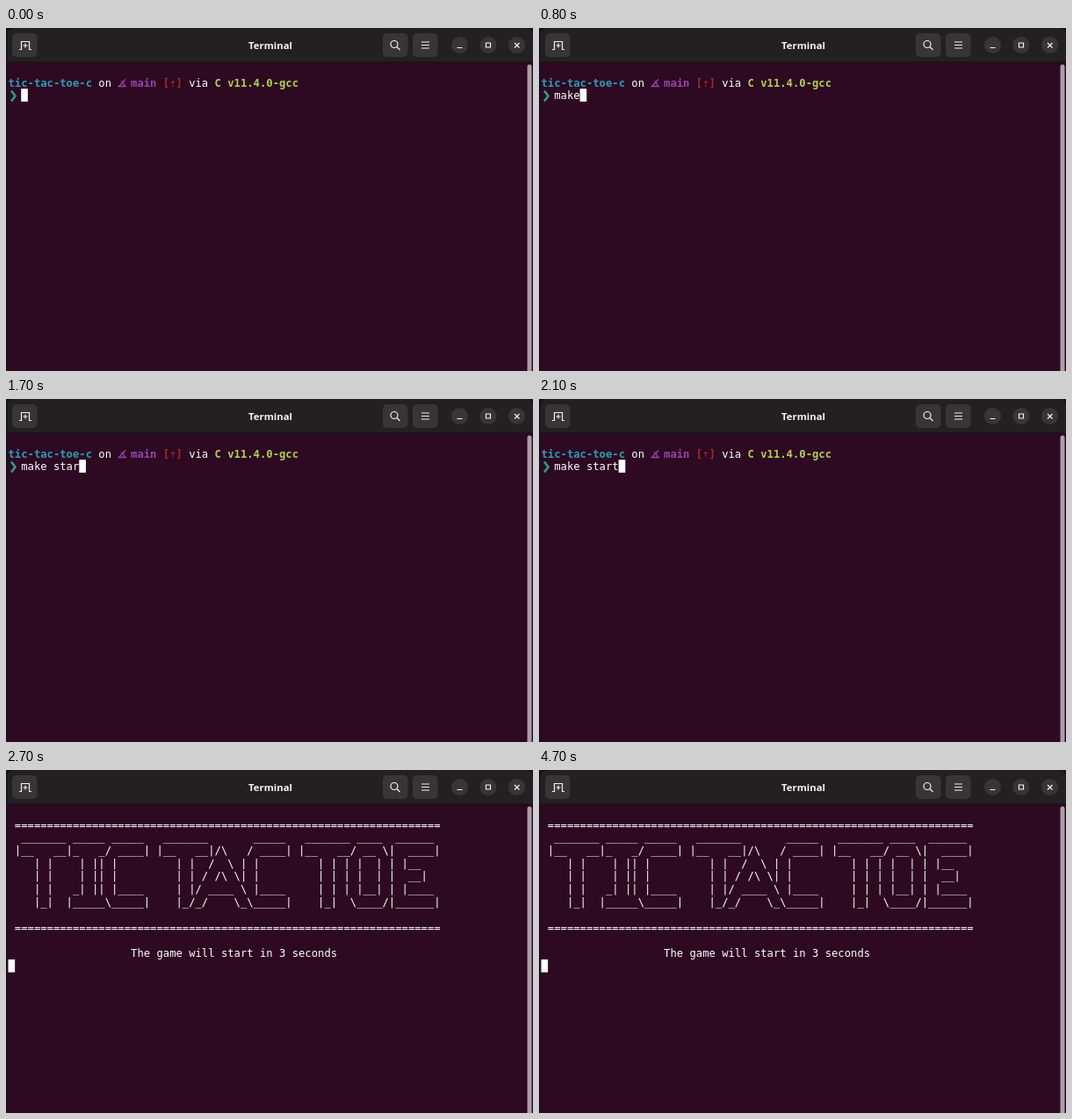
An HTML page with a canvas for the animation above (5300 ms loop, 600 by 391 pixels).

```html
<!DOCTYPE html>
<html lang="en">
<head>
<meta charset="utf-8">
<title>Terminal</title>
<style>
  html, body { margin: 0; width: 100%; height: 100%; overflow: hidden; background: #2d0922; }
  canvas { display: block; width: 600px; height: 391px; }
</style>
</head>
<body>
<canvas id="stage" width="600" height="391"></canvas>
<script>
const ctx = document.getElementById('stage').getContext('2d');
const LOOP = 5300, BANNER_AT = 2400, BLINK = 600, BLINK_FROM = 2900;
const CELL = 7.345, ROW = 14.67, LEFT = 2.5, TOP = 40.3;
const COMMAND = 'make start';
const KEY_TIMES = [300, 400, 500, 700, 900, 1300, 1500, 1600, 1700, 2100];
const RULE = '='.repeat(66);
const BANNER = [
  RULE,
  String.raw` _______ _____ _____   _______       _____   _______ ____  ______`,
  String.raw`|__   __|_   _/ ____| |__   __|/\   / ____| |__   __/ __ \|  ____|`,
  String.raw`   | |    | || |         | |  /  \ | |         | | | |  | | |__`,
  String.raw`   | |    | || |         | | / /\ \| |         | | | |  | |  __|`,
  String.raw`   | |   _| || |____     | |/ ____ \ |____     | | | |__| | |____`,
  String.raw`   |_|  |_____\_____|    |_/_/    \_\_____|    |_|  \____/|______|`,
  '',
  RULE,
  '',
  ' '.repeat(18) + 'The game will start in 3 seconds'
];

function box(x, y, w, h, radius, color) {
  ctx.fillStyle = color;
  ctx.beginPath();
  ctx.roundRect(x, y, w, h, radius);
  ctx.fill();
}

function stroke(path, color = '#f2f0f1', width = 1.2) {
  ctx.strokeStyle = color;
  ctx.lineWidth = width;
  ctx.stroke(new Path2D(path));
}

// Each character sits in its own terminal cell.
function print(text, col, row, color = '#fff', bold = false) {
  ctx.font = `${bold ? 'bold ' : ''}12.2px "DejaVu Sans Mono", monospace`;
  ctx.textAlign = 'left';
  ctx.fillStyle = color;
  [...text].forEach((char, i) => {
    if (char !== ' ') ctx.fillText(char, LEFT + (col + i) * CELL, TOP + row * ROW + 11.6);
  });
}

function cursor(col, row) {
  box(LEFT + col * CELL, TOP + row * ROW - 0.4, CELL + 0.3, ROW, 0, '#fff');
}

function drawWindow() {
  box(0, 0, 600, 391, 0, '#17101a');
  box(1.5, 0, 598.5, 391, [8, 8, 0, 0], '#2d0922');
  box(1.5, 0, 598.5, 39, [8, 8, 0, 0], '#232022');
  box(1.5, 38, 598.5, 1, 0, '#1a1619');
  box(593.5, 41.5, 5, 360, 2.5, '#aa9fa6');

  for (const x of [7, 429, 463]) box(x, 6, 28.5, 27, 5, '#383537');
  for (const x of [516.5, 549, 581.5]) box(x - 9.5, 10, 19, 19, 9.5, '#383537');

  stroke('M15 24.5H17.5V15.5H26.5V24.5H29M22 17.5V22.5M19.5 20H24.5');
  stroke('M446 18.5a4 4 0 1 0-8 0a4 4 0 1 0 8 0M445 21.5L448.5 25');
  stroke('M473 16H482M473 19.5H482M473 23H482');
  stroke('M513.5 22.5H519.5M546.5 17H551.5V22H546.5ZM579 17L584.5 22.5M584.5 17L579 22.5');

  ctx.font = 'bold 11.3px "Open Sans", "Noto Sans", sans-serif';
  ctx.textAlign = 'center';
  ctx.fillStyle = '#f5f3f4';
  ctx.fillText('Terminal', 301, 23.5);
}

function drawPrompt(t) {
  const purple = '#9a45b0', red = '#a82a22', lime = '#b0d050';
  print('tic-tac-toe-c', 0, 1, '#2a9fb5', true);
  print('on', 14, 1);
  stroke('M136 58.5L128.5 66.5H137M131 60.5Q135 62.5 134.5 66', purple, 1.3);
  print('main', 19, 1, purple, true);
  print('[⇡]', 24, 1, red, true);
  print('via', 28, 1);
  print('C v11.4.0-gcc', 32, 1, lime, true);
  stroke('M6 71.5L10.5 77.5L6 83.5', '#26a080', 2.6);

  const typed = KEY_TIMES.filter(time => t >= time).length;
  print(COMMAND.slice(0, typed), 2, 2);
  cursor(2 + typed, 2);
}

function drawBanner(t) {
  BANNER.forEach((line, i) => print(line, 1, i + 1));
  const visible = t < BLINK_FROM || Math.floor((t - BLINK_FROM) / BLINK) % 2 === 1;
  if (visible) cursor(0, 12);
}

function frame(now) {
  const t = now % LOOP;
  drawWindow();
  if (t < BANNER_AT) drawPrompt(t);
  else drawBanner(t);
  requestAnimationFrame(() => frame(performance.now() - start));
}

const start = performance.now();
frame(0);
</script>
</body>
</html>
```
